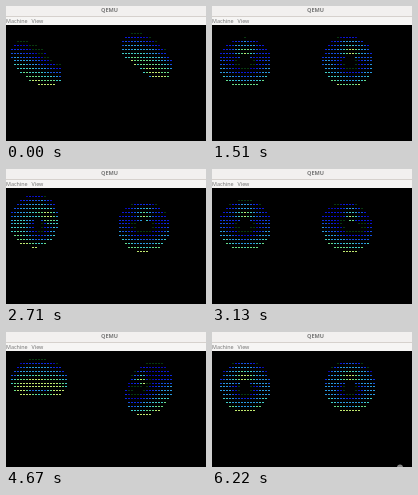
An HTML page with a canvas for the animation above (6270 ms loop, 200 by 135 pixels).

```html
<!DOCTYPE html>
<html lang="en">
<head>
<meta charset="utf-8">
<title>QEMU</title>
<style>
  html, body { margin: 0; width: 100%; height: 100%; overflow: hidden; background: #000; }
  .bar { position: absolute; left: 0; width: 200px; white-space: pre; font-family: "Noto Sans", "Open Sans", sans-serif; }
  .title { top: 0; height: 10px; background: #f2f0ef; border-bottom: 1px solid #d6d1cd; color: #777; font-size: 5.6px; font-weight: 600; line-height: 8px; text-align: center; text-indent: 7px; }
  .menu { top: 11px; height: 8px; background: #f6f5f4; color: #777; font-size: 5.4px; line-height: 8px; }
  .menu span { position: absolute; top: 0; }
  canvas { position: absolute; left: 0; top: 19px; }
</style>
</head>
<body>
<div class="bar title">QEMU</div>
<div class="bar menu"><span style="left:0">Machine</span><span style="left:25.5px">View</span></div>
<canvas id="screen" width="200" height="116"></canvas>
<script>
const LOOP = 6270;
const TOP = 19, COL = 3, ROW = 3.92, FIRST_ROW = 27;
const SCALE = 37.5;
const ctx = document.getElementById('screen').getContext('2d');

// Start time and step number; steps are 70 ms apart within each run.
const RUNS = [[0, 0], [670, 10], [2010, 29], [6220, 89]];

// Tilt of each ring towards the viewer: step, degrees right, degrees down.
const DONUTS = [
  { x: 33, y: 53, tilt: [[0, -48, 58], [22, 0, 18], [32, -59, -37], [45, 0, 16], [67, 3, -62], [78, 0, 14], [89, 2, 4]] },
  { x: 138, y: 53, tilt: [[0, 48, -58], [22, -10, 10], [32, 16, 18], [45, -20, 28], [67, 42, 26], [78, 0, 7], [89, 0, 4]] }
];

const SHADES = ['#0808b4', '#0a14d8', '#0c28e0', '#1450e0', '#2898e0', '#40ccc8', '#68dc88', '#c0e870'];
const DIM = '#07380f';
const LIGHT = { y: 0.75, z: -0.6 };

function stepAt(time) {
  const i = RUNS.findLastIndex(run => time >= run[0]);
  const next = RUNS[i + 1];
  const step = RUNS[i][1] + Math.floor((time - RUNS[i][0]) / 70);
  return Math.min(step, next ? next[1] - 1 : 89);
}

function tiltAt(keys, step) {
  const i = Math.max(1, keys.findIndex(key => key[0] >= step));
  const a = keys[i - 1], b = keys[i];
  const f = (step - a[0]) / (b[0] - a[0]);
  return [a[1] + (b[1] - a[1]) * f, a[2] + (b[2] - a[2]) * f];
}

function drawDonut(donut, step) {
  const [tx, ty] = tiltAt(donut.tilt, step);
  const size = Math.hypot(tx, ty) || 1;
  const dx = tx / size, dy = ty / size;
  const c = Math.cos(size * Math.PI / 180), s = Math.sin(size * Math.PI / 180);

  const turn = (x, y, z) => {
    const along = x * dx + y * dy, across = y * dx - x * dy;
    const u = along * c + z * s;
    return [u * dx - across * dy, u * dy + across * dx, z * c - along * s];
  };

  const cells = new Map();
  for (let i = 0; i < 180; i++) {
    const ring = i * Math.PI / 90, cr = Math.cos(ring), sr = Math.sin(ring);
    for (let j = 0; j < 64; j++) {
      const tube = j * Math.PI / 32, ct = Math.cos(tube), st = Math.sin(tube);
      const [x, y, z] = turn(cr * (2 + ct), sr * (2 + ct), st);
      const near = 1 / (z + 5);
      const col = Math.round((donut.x + SCALE * near * x) / COL);
      const row = Math.round((donut.y + SCALE * near * y - FIRST_ROW) / ROW);
      const key = col + ',' + row;
      const old = cells.get(key);
      if (old && old.near >= near) continue;
      const n = turn(cr * ct, sr * ct, st);
      cells.set(key, { col, row, near, lum: n[1] * LIGHT.y + n[2] * LIGHT.z });
    }
  }

  for (const { col, row, lum } of cells.values()) {
    if (lum < -0.3) continue;
    const shade = Math.min(SHADES.length - 1, Math.floor(lum * SHADES.length));
    ctx.fillStyle = lum < 0 ? DIM : SHADES[shade];
    ctx.fillRect(col * COL - 1, Math.round(FIRST_ROW + row * ROW) - TOP, 2, 1);
  }
}

function drawPointer() {
  ctx.fillStyle = '#888';
  ctx.beginPath();
  ctx.arc(188, 116.5, 3, 0, 2 * Math.PI);
  ctx.fill();
}

function draw(step) {
  ctx.fillStyle = '#000';
  ctx.fillRect(0, 0, 200, 116);
  DONUTS.forEach(donut => drawDonut(donut, step));
  if (step === 89) drawPointer();
}

const start = performance.now();
let shown = -1;
function tick() {
  const step = stepAt((performance.now() - start) % LOOP);
  if (step !== shown) draw(shown = step);
  requestAnimationFrame(tick);
}
tick();
</script>
</body>
</html>
```
